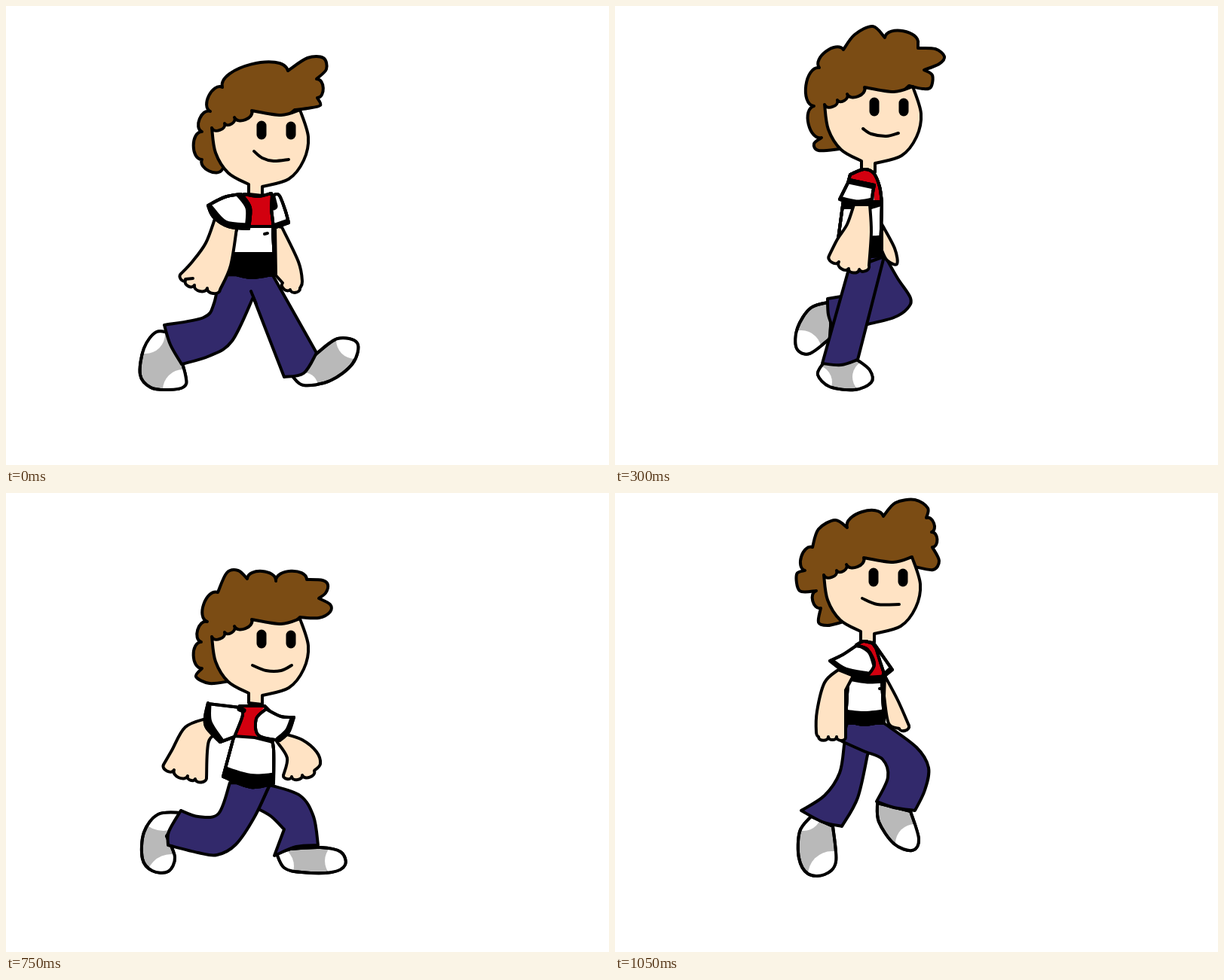
These frames come from a looping animation (800x610 px, 1200 ms). An HTML page with a canvas:

```html
<!DOCTYPE html>
<html lang="en">
<head>
<meta charset="utf-8">
<title>Walk cycle</title>
<style>
html, body { margin: 0; width: 100%; height: 100%; overflow: hidden; background: #fff; }
canvas { display: block; }
</style>
</head>
<body>
<canvas id="stage" width="800" height="610"></canvas>
<script>
const ctx = document.getElementById('stage').getContext('2d');
const POSE_MS = 150;
const HAIR = '#7b4c14', SKIN = '#ffe3c4', JEANS = '#32296b';
const WHITE = '#fff', GREY = '#b9b9b9', RED = '#d2000f', BLACK = '#000';

// Rounded bump from a to b, on the left of the direction of travel.
function puff(path, a, b) {
  const dx = b[0] - a[0], dy = b[1] - a[1];
  const rise = 60 / (110 + Math.hypot(dx, dy));
  path.bezierCurveTo(a[0] + dy * rise, a[1] - dx * rise,
    b[0] + dy * rise, b[1] - dx * rise, ...b);
}

function smooth(path, pts) {
  const handle = (p, from, to) => p.map((v, k) => v + (to[k] - from[k]) / 6);
  for (let i = 0; i + 1 < pts.length; i++) {
    const a = pts[i], b = pts[i + 1];
    const before = pts[i - 1] || a, after = pts[i + 2] || b;
    path.bezierCurveTo(...handle(a, before, b), ...handle(b, after, a), ...b);
  }
}

// "/" starts a new smooth run at a corner, "~" makes a puff to the next point.
function trace(text) {
  const path = new Path2D();
  let last;
  for (const [, mark, run] of text.matchAll(/([\/~]?)([^\/~]+)/g)) {
    const nums = run.trim().split(' ').map(Number);
    const pts = last ? [last] : [];
    for (let i = 0; i < nums.length; i += 2) pts.push([nums[i], nums[i + 1]]);
    if (!last) path.moveTo(...pts[0]);
    if (mark === '~') puff(path, ...pts);
    else smooth(path, pts);
    last = pts[pts.length - 1];
  }
  return path;
}

let outline;

function line(text, width = 4) {
  ctx.lineWidth = width;
  ctx.stroke(trace(text));
}

function shape(color, text) {
  outline = trace(text);
  outline.closePath();
  ctx.fillStyle = color;
  ctx.fill(outline);
  ctx.lineWidth = 4;
  ctx.stroke(outline);
}

// Draws clipped to the latest shape, then renews its outline.
function inside(paint) {
  ctx.save();
  ctx.clip(outline);
  paint();
  ctx.restore();
  ctx.lineWidth = 4;
  ctx.stroke(outline);
}

const patch = (color, text) => inside(() => {
  ctx.fillStyle = color;
  ctx.fill(trace(text));
});
const cuff = text => inside(() => line(text, 11));

function at(dx, dy, paint) {
  ctx.save();
  ctx.translate(dx, dy);
  paint();
  ctx.restore();
}

// A grey shoe with white discs for heel and toe.
function shoe(text, ...discs) {
  shape(GREY, text);
  inside(() => {
    ctx.fillStyle = WHITE;
    for (const [x, y, r] of discs) {
      ctx.beginPath();
      ctx.arc(x, y, r, 0, 2 * Math.PI);
      ctx.fill();
    }
  });
}

function head(dx, dy, mouth) {
  at(dx, dy, () => {
    shape(SKIN, '390 138/365 145 326 139~303 148~290 156~273 162/278 195 295 222 322 237/322 250/340 252/340 240/375 230 395 205 401 174 390 138');
    line('339 159/339 171', 13);
    line('378 160/378 171', 13);
  });
  line(mouth);
}

function strideHair() {
  shape(HAIR, '287 217~260 204~260 167~271 140~287 108~374 86/400 69 421 69 425 84 412 97~413 122/417 132 400 136 383 138');
}
function strideShoes() {
  shoe('222 436 200 433 183 455 178 490 192 507 215 510 236 506 238 490 222 436', [185, 436, 26], [235, 510, 27]);
  shoe('412 462 440 442 466 448 460 475 430 498 395 504 380 492', [463, 444, 25], [395, 506, 19]);
}
function strideArm() {
  shape(SKIN, '306 296/298 345 284 377~267 375~250 371~238 365~232 356/247 340 265 315 277 283');
  line('238 363/248 362');
}

function crouchShoes() {
  shoe('236 424 205 426 186 450 184 485 197 501 218 502 227 483 216 455', [212, 410, 38], [222, 512, 33]);
  shoe('362 478 372 497 395 503 435 503 453 493 447 476 420 470 380 472', [357, 495, 28], [452, 488, 26]);
}
function crouchArm() {
  shape(SKIN, '283 318/266 330 263 378~248 380~238 376~220 368~206 361/217 342 235 311 265 299');
}
function crouchBackArm() {
  shape(SKIN, '372 318/396 326 415 342 420 358 412 367~396 373~382 375~371 373/376 350 362 328');
}

function strideA() {
  strideShoes();
  shape(JEANS, '283 357 276 395 262 414 210 424/218 450 233 476/270 465 300 445 328 387/369 493/395 488 412 461/354 358');
  line('325 379/332 396');
  shape(SKIN, '357 292/366 294/388 340 393 366 390 375~377 377~367 368/358 358');
  strideHair();
  head(0, 0, '329 193 340 202 355 206 375 204');
  shape(WHITE, '316 250/335 253 352 249/356 270 354 300/357 356/325 361 295 354/305 300');
  patch(RED, '312 250/352 249/356 265 353 292/320 292');
  patch(BLACK, '290 327/360 327/360 365/290 365');
  line('318 293/354 293');
  line('343 303/347 302');
  shape(WHITE, '353 252/362 251 370 270 375 288/355 295/352 270');
  cuff('351 250/355 266');
  cuff('355 295/375 288');
  strideArm();
  shape(WHITE, '312 250 290 254 268 265/275 280 295 293 322 296/324 268 312 250');
  cuff('309 248/323 268 322 296');
  cuff('269 268 290 290 322 294');
}

function strideB() {
  at(2, 0, strideShoes);
  shape(JEANS, '332 402/370 493/400 486 420 458/380 412 350 357');
  shape(JEANS, '296 350 286 390 270 412 217 433/225 457 237 480/280 460 320 433 342 395 349 356');
  at(-3, -2, strideHair);
  head(2, 1, '329 198 342 203 360 203 373 199');
  shape(WHITE, '306 251/318 248 335 252 347 250/352 265 348 295/351 357/320 356 291 349/303 332/304 285');
  patch(RED, '304 245/350 250/336 270 337 285/303 283');
  patch(BLACK, '285 332/325 336 355 336/355 362/285 362');
  line('304 285 320 287 338 287');
  at(2, 2, strideArm);
  shape(SKIN, '343 293/368 294/392 340 396 358 388 368~374 370~363 368~354 367/347 325 343 293');
  shape(WHITE, '306 254 293 253 269 266/285 283 304 290/302 270');
  cuff('270 267 285 282 304 289');
  shape(WHITE, '350 258/368 267 383 285/362 294 337 293/335 273 350 258');
  cuff('337 292 360 294 383 286');
  cuff('350 258 335 273');
}

function crouchA() {
  crouchShoes();
  shape(JEANS, '297 384/277 431/233 423/214 457/250 476 290 480 312 462 326 418/362 440/359 480/385 470 410 471/406 435 390 405 356 386');
  crouchBackArm();
  shape(HAIR, '297 250~250 229~250 192/245 165 252 142 273 143/278 122 292 104 303 106/310 96 328 90 333 107~375 115/405 104 428 108 427 127 414 137/430 138 435 148 425 158 393 167');
  head(3, 30, '330 229 345 236 364 237 376 231');
  shape(WHITE, '298 280/350 282/353 330 356 388/325 390 293 378/299 328');
  patch(RED, '298 278/352 282/352 319/330 318 310 314');
  patch(BLACK, '290 359/325 369 360 370/360 395/285 395');
  line('309 315 330 321 353 320');
  line('340 330/344 330');
  shape(WHITE, '343 279/358 292 382 304/370 323 352 331');
  patch(RED, '344 280/363 295/352 305');
  cuff('382 306/370 324/352 331');
  line('351 304/362 295');
  crouchArm();
  shape(WHITE, '266 279/296 280/300 300 314 317/290 329/270 312 264 295 266 279');
  cuff('267 280 270 303 291 327');
  cuff('295 280/301 299/313 316');
}

function crouchB() {
  at(-3, 1, crouchShoes);
  shape(JEANS, '335 420/352 430 369 447/356 482/385 470 414 468/408 430 390 402 350 388');
  shape(JEANS, '297 385 282 426 255 430 232 422/216 450 215 468/255 478 280 481 305 467 330 430 350 387');
  at(-3, 2, crouchBackArm);
  shape(HAIR, '297 250/270 253 252 244 260 233~259 198~267 171~281 132/293 106 308 103 320 114~358 117~399 115/420 116 427 122 424 133 415 140/430 148 430 158 415 166 390 165');
  head(0, 29, '327 229 345 236 365 236 379 229');
  shape(WHITE, '310 283/343 283/350 290/351 325/355 340 355 386/325 391 288 377/302 325');
  patch(RED, '308 283/344 283/334 300 335 324/302 322');
  patch(BLACK, '285 361/325 373 360 371/360 396/280 396');
  line('302 323/330 325/354 331');
  at(3, 0, crouchArm);
  shape(WHITE, '268 280/310 285/314 295 303 324/284 331/266 312 264 298 268 279');
  cuff('267 280 268 305 284 330');
  line('310 287/315 289', 7);
  shape(WHITE, '345 287/365 297 382 298/375 318 363 329/335 322 332 300 345 287');
  cuff('382 300 375 317 362 329');
}

function inOrder(swapped, far, near) {
  for (const leg of swapped ? [near, far] : [far, near]) leg();
}

function passing(swapped) {
  inOrder(swapped, () => {
    shoe('288 393 260 401 242 428 241 455 258 462 285 442', [247, 458, 27]);
    shape(JEANS, '310 335/358 332/375 362 392 388 388 402 370 414 335 423/289 428/283 410 282 389/318 383');
  }, () => {
    shoe('276 475 269 490 285 506 318 510 340 500 338 484 321 470', [265, 500, 23], [338, 493, 23]);
    shape(JEANS, '310 350/275 475/300 477 322 470/357 333');
  });
  shape(SKIN, '354 290/371 322 374 343 361 338 354 325');
  shape(HAIR, '298 190/270 192 264 183 274 175~264 133~271 82~303 58/318 38 342 27 358 42~402 50/402 56/425 57 437 67 430 77 410 85/421 92 419 108 408 110 390 106');
  head(5, -31, '329 163 340 170 360 173 376 169');
  shape(WHITE, '312 224 330 217 343 222 351 240 354 262/352 331/335 333/296 310/303 258');
  patch(RED, '310 215/345 215/358 258/344 258/344 236/312 235');
  patch(BLACK, '295 258/356 258/356 265/340 270/300 270');
  patch(BLACK, '335 306/360 304/360 340/335 340');
  shape(SKIN, '338 264/340 300 337 345~324 350~310 349~297 340~284 332/295 310 308 290 317 264');
  shape(WHITE, '311 231/344 238/342 248 341 259/318 261 298 257/304 245');
  cuff('311 231/344 238');
  cuff('297 258 320 263 342 260');
}

function high(swapped) {
  inOrder(swapped, () => {
    shoe('260 430 245 450 244 485 256 506 278 507 293 490 289 443', [250, 425, 24], [288, 508, 32]);
    shape(JEANS, '310 306/304 335/298 372 278 402 247 422/275 437 301 443/322 405 335 348/355 306');
  }, () => {
    shoe('348 412 350 437 370 466 394 475 403 460 392 423', [398, 466, 26]);
    shape(JEANS, '308 306/301 330/330 343 355 354 362 378 347 410/370 418 398 422/411 395 416 365 400 338 357 306');
  });
  shape(SKIN, '358 243/375 275 390 309~377 313/363 306 357 270');
  shape(HAIR, '300 172/282 176 270 172 273 153~267 130/245 130 241 108 252 103~262 72/270 48 292 36 308 46~356 31/372 13 398 9 415 20 413 33~420 52~421 72/430 90 422 102 398 98');
  head(4, -53, '328 140 348 148 377 148');
  shape(WHITE, '320 202/330 197 342 200/357 225 354 250/357 303/330 308 306 302/309 250');
  patch(RED, '325 195/343 195/354 220 356 247/332 247/342 228 322 204');
  patch(BLACK, '300 287/330 290 360 287/360 312/300 312');
  cuff('310 244 335 248 358 247');
  line('351 260/354 260');
  shape(WHITE, '345 202/368 235/358 243/352 225');
  cuff('369 234/358 244');
  shape(SKIN, '316 243/306 262/306 325~294 324~283 324~270 324/267 318 268 290 278 252 296 235');
  shape(WHITE, '320 203 302 215 285 223/305 237 334 244/344 228 335 208 320 203');
  cuff('285 224 305 237 335 243');
  line('324 203 337 212 343 228');
}

function highLow() {
  ctx.translate(0, 5);
  ctx.scale(1, 0.99);
  high(true);
}

const cycle = [
  strideA, crouchA, () => passing(false), highLow,
  strideB, crouchB, () => at(0, -3, () => passing(true)), () => high(false)
];

function draw(now) {
  ctx.fillStyle = WHITE;
  ctx.fillRect(0, 0, 800, 610);
  ctx.strokeStyle = BLACK;
  ctx.lineCap = ctx.lineJoin = 'round';
  at(0, 0, cycle[Math.floor(now / POSE_MS) % cycle.length]);
  requestAnimationFrame(draw);
}
draw(performance.now());
</script>
</body>
</html>
```
